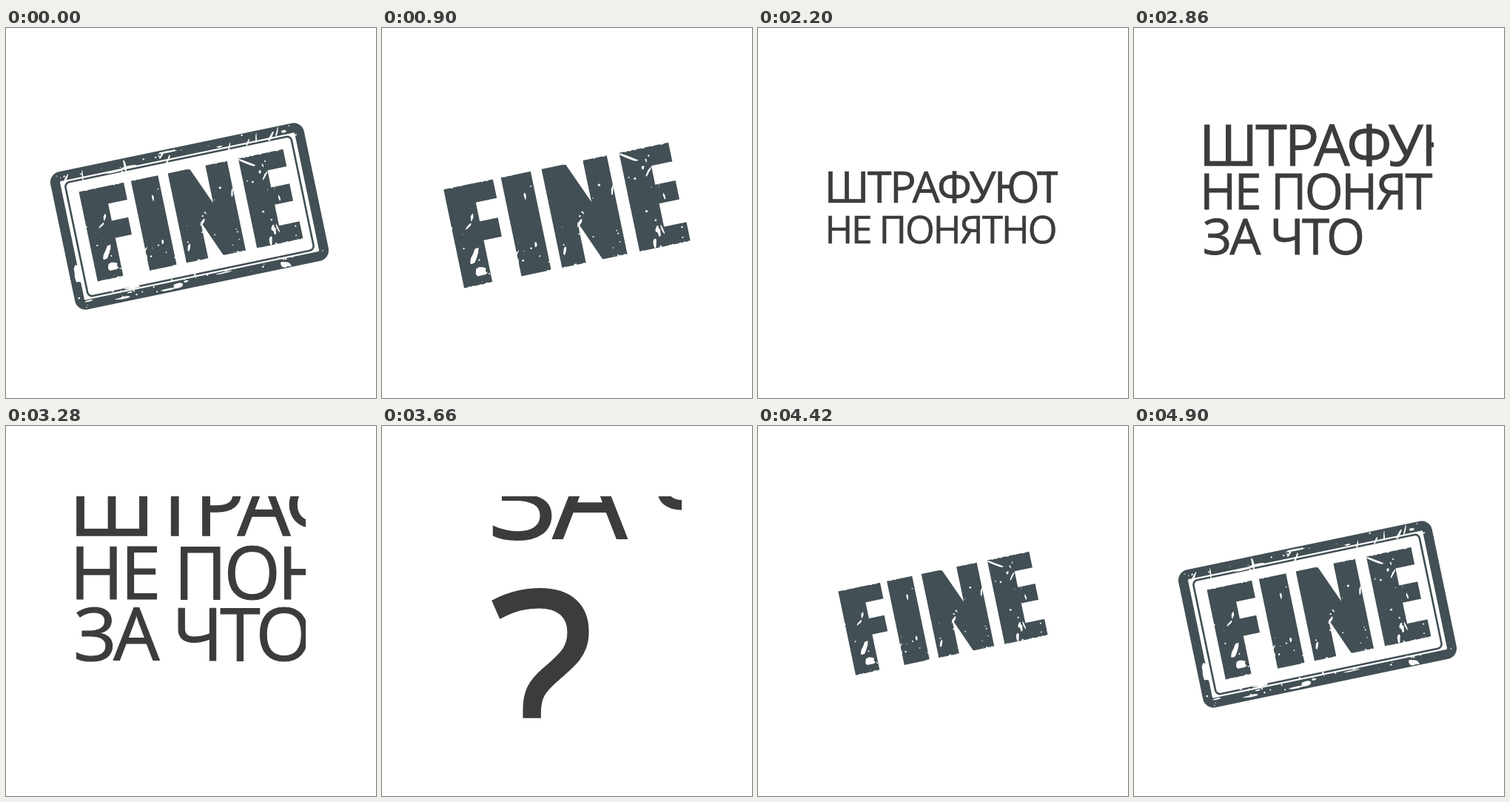
Write an HTML page with a canvas that moves like this. It is 500 px wide and 500 px high and loops after 5260 ms.

```html
<!DOCTYPE html>
<html lang="ru">
<head>
<meta charset="utf-8">
<style>
  html, body { margin: 0; width: 100%; height: 100%; overflow: hidden; background: #fff; }
  canvas { display: block; width: 500px; height: 500px; }
</style>
</head>
<body>
<canvas id="stage" width="500" height="500"></canvas>
<script>
const ctx = document.getElementById('stage').getContext('2d');
const LOOP = 5260;
const INK = '#424f54';
const TEXT = '#3c3c3c';
const TILT = -11.8 * Math.PI / 180;
const EM = 100;
const CAP = 0.714 * EM;

// Linear and smooth progress from 0 to 1 between two times.
const linear = (t, from, to) => Math.min(1, Math.max(0, (t - from) / (to - from)));
const smooth = (t, from, to) => {
  const u = linear(t, from, to);
  return u * u * (3 - 2 * u);
};

let seed = 7;
function random(min = 0, max = 1) {
  seed = (seed * 16807) % 2147483647;
  return min + (max - min) * seed / 2147483647;
}

// Ragged ellipse; all stamp shapes use the tilted axes of the stamp.
function blot(path, x, y, rx, ry, angle = 0) {
  const turn = new DOMMatrix().translate(x, y).rotate(angle);
  const shape = new Path2D();
  for (let i = 0; i < 11; i++) {
    const a = i / 11 * Math.PI * 2, r = random(0.75, 1.25);
    shape.lineTo(Math.cos(a) * rx * r, Math.sin(a) * ry * r);
  }
  shape.closePath();
  path.addPath(shape, turn);
}

function makeLetters() {
  const path = new Path2D();
  const stem = (x, w) => path.rect(x, -68, w, 136);
  const arm = (x, w, row) => path.rect(x, [-68, -16, 42][row], w, 26);
  stem(-156, 39);
  arm(-156, 68, 0);
  arm(-156, 64, 1);
  stem(-77, 41);
  stem(-21, 33);
  stem(36, 33);
  path.moveTo(-21, -68);
  path.lineTo(12, -68);
  path.lineTo(69, 68);
  path.lineTo(35, 68);
  stem(86, 39);
  arm(86, 68, 0);
  arm(86, 67, 1);
  arm(86, 70, 2);
  return path;
}

function makeLetterWear() {
  const path = new Path2D();
  blot(path, -129, 51, 8, 6);
  blot(path, -134, 29, 3.5, 12, 30);
  blot(path, 98, -59, 14, 1.6, 32);
  for (let i = 0; i < 22; i++) {
    blot(path, random(-150, 150), random(-55, 62), random(1, 2.2), random(2, 8), random(-20, 60));
  }
  for (let i = 0; i < 60; i++) {
    const r = random(0.5, 1.6);
    blot(path, random(-156, 156), 68 - 136 * random() ** 1.6, r, r);
  }
  for (let i = 0; i < 60; i++) blot(path, random(-156, 156), i % 2 ? 68 : -68, random(0.5, 2), 0.8);
  return path;
}

function makeFrameWear() {
  const path = new Path2D();
  blot(path, -164, 46, 5, 11);
  blot(path, -35, 89, 7, 3.5);
  blot(path, 114, 90, 8, 4, 10);
  for (let i = 0; i < 14; i++) {
    blot(path, random(-165, 165), (i % 3 ? 1 : -1) * random(78, 92), random(3, 14), random(0.8, 1.8));
  }
  for (let i = 0; i < 10; i++) {
    blot(path, random(-165, 165), random(-90, -76), random(0.8, 1.5), random(4, 9), random(0, 45));
  }
  for (let i = 0; i < 50; i++) {
    const r = random(0.4, 1.4);
    blot(path, random(-170, 170), (i % 3 ? 1 : -1) * random(77, 94), r, r);
  }
  return path;
}

const letters = makeLetters();
const letterWear = makeLetterWear();
const frameWear = makeFrameWear();

function place(x, y, scale, angle, paint) {
  if (scale < 0.002) return;
  ctx.save();
  ctx.translate(x, y);
  ctx.scale(scale, scale);
  ctx.rotate(angle);
  paint();
  ctx.restore();
}

function fill(path, color) {
  ctx.fillStyle = color;
  ctx.fill(path);
}

function border(halfW, halfH, radius, width) {
  ctx.beginPath();
  ctx.roundRect(-halfW, -halfH, halfW * 2, halfH * 2, radius);
  ctx.lineWidth = width;
  ctx.stroke();
}

function drawStamp(t) {
  const frame = 1 - smooth(t, 280, 700) + smooth(t, 4580, 4900);
  const word = 1 + 0.2 * smooth(t, 280, 840) - 1.2 * smooth(t, 840, 1180)
    + 1.2 * smooth(t, 4200, 4516) - 0.2 * smooth(t, 4540, 4900);
  ctx.strokeStyle = INK;
  place(248, 254.5, frame, TILT, () => {
    border(168.5, 88.5, 8, 13);
    border(156, 78.5, 6, 2.6);
    fill(frameWear, '#fff');
  });
  place(250, 253, word / 1.1, TILT, () => {
    fill(letters, INK);
    fill(letterWear, '#fff');
  });
}

// Baseline and cap height are measured from the first line at zoom 1.
const lines = [
  { text: 'ШТРАФУЮТ', at: 1340, base: 0, cap: 42 },
  { text: 'НЕ ПОНЯТНО', at: 1880, base: 45, cap: 36.5 },
  { text: 'ЗА ЧТО', at: 2420, base: 88, cap: 36.5 },
  { text: '?', at: 3360, base: 175, cap: 75 }
];

function drawLine({ text, at, base, cap }, t) {
  const grow = smooth(t, at, at + 300);
  const drop = base && 40 * (1 - linear(t, at, at + 640)) ** 2;
  const baseline = base + drop - cap * (1 - grow);
  place(0, baseline, grow * cap / CAP, 0, () => {
    const x = ctx.measureText(text).actualBoundingBoxLeft;
    ctx.fillText(text, x, 0);
    ctx.strokeText(text, x, 0);
  });
}

function drawLines(t) {
  const drift = linear(t, 1340, 2740);
  const near = smooth(t, 2744, 3044);
  const close = smooth(t, 3405, 3840);
  const leave = smooth(t, 4060, 4260);
  ctx.save();
  ctx.beginPath();
  ctx.rect(95, 95, 310, 310);
  ctx.clip();
  ctx.fillStyle = ctx.strokeStyle = TEXT;
  ctx.lineWidth = 1.2;
  ctx.font = `${EM}px "Open Sans", "Noto Sans", sans-serif`;
  ctx.letterSpacing = '-4px';
  place(250, 250, 1 - leave, 0, () => {
    const left = 95 + 87 * close;
    const top = 286 - 81 * drift - 57 * near - 428 * close;
    place(left - 250, top - 250, 1 + 0.92 * near + 1.88 * close, 0, () => {
      for (const line of lines) drawLine(line, t);
    });
  });
  ctx.restore();
}

function draw(now) {
  const t = now % LOOP;
  ctx.fillStyle = '#fff';
  ctx.fillRect(0, 0, 500, 500);
  drawStamp(t);
  drawLines(t);
}

let start;
function tick(now) {
  start ??= now;
  draw(now - start);
  requestAnimationFrame(tick);
}
draw(0);
requestAnimationFrame(tick);
</script>
</body>
</html>
```
